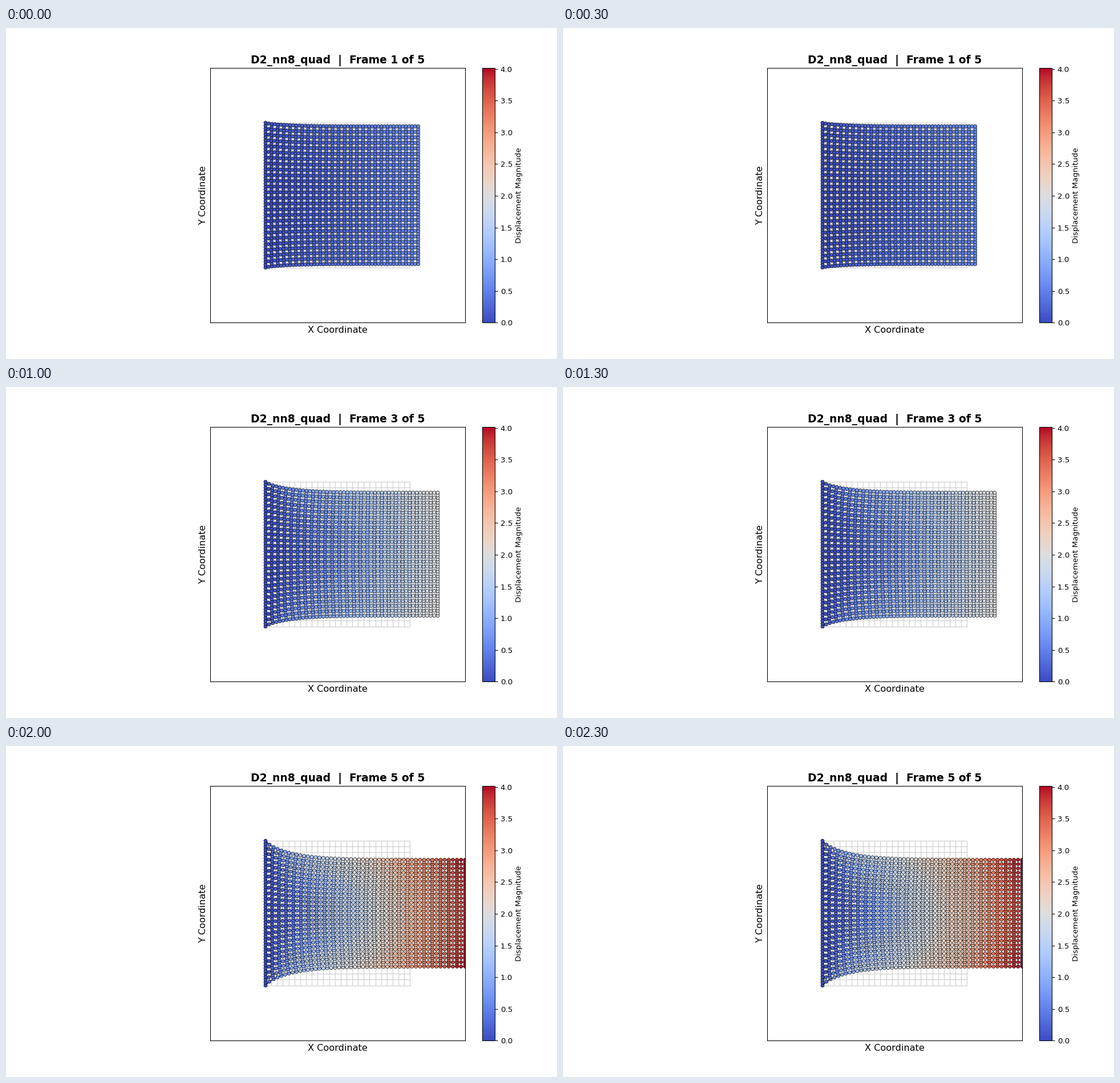
Animation, 966 px wide and 580 px high, one loop 2500 ms. Source, as a matplotlib script:

```python
import matplotlib.pyplot as plt
import numpy as np
from matplotlib.animation import FuncAnimation
from matplotlib.collections import LineCollection

# Block of SIDE x SIDE made of N x N eight-node quads, clamped on the left
# and stretched to the right (compressible neo-Hookean, plane strain).
N, SIDE = 25, 10.0
MU, LAM = 1.0, 9.0
PULLS = [0.56, 1.20, 1.91, 2.78, 3.81]
MAX_MAG = 4.02
SCALE = 0.966  # point sizes relative to a 10 inch wide figure

# Node grid; element centres carry no node
M = 2 * N + 1
gi, gj = np.meshgrid(np.arange(M), np.arange(M), indexing="ij")
has_node = ~((gi % 2 == 1) & (gj % 2 == 1))
ids = np.full((M, M), -1)
ids[has_node] = np.arange(has_node.sum())
nodes = np.column_stack([gi[has_node], gj[has_node]]) * SIDE / (M - 1)

OFFSETS = [(a, b) for a in range(3) for b in range(3) if (a, b) != (1, 1)]
elems = np.array([[ids[2 * i + a, 2 * j + b] for a, b in OFFSETS]
                  for i in range(N) for j in range(N)])
dofs = (2 * elems[:, :, None] + np.arange(2)).reshape(len(elems), 16)
rows = np.repeat(dofs, 16, axis=1).reshape(-1, 16, 16)
cols = rows.transpose(0, 2, 1)
SIZE = 2 * len(nodes)
HELD = 2 * M                       # leading unknowns on the clamped edge
WIDTH = 2 * (M + N + 1)            # unknowns per element column
BLOCKS = [slice(HELD + k * WIDTH, HELD + (k + 1) * WIDTH) for k in range(N)]
pulled = 2 * ids[-1]


def shape_gradient(x, y):
    grads = []
    for a, b in OFFSETS:
        p, q = a - 1, b - 1
        if p == 0:
            g = (-x * (1 + y * q), 0.5 * q * (1 - x * x))
        elif q == 0:
            g = (0.5 * p * (1 - y * y), -y * (1 + x * p))
        else:
            g = (0.25 * p * (1 + y * q) * (2 * x * p + y * q),
                 0.25 * q * (1 + x * p) * (2 * y * q + x * p))
        grads.append(g)
    return np.array(grads) * 2 * N / SIDE


def strain_operator():
    pts = [(-np.sqrt(0.6), 5 / 9), (0.0, 8 / 9), (np.sqrt(0.6), 5 / 9)]
    ops, weights = [], []
    for x, wx in pts:
        for y, wy in pts:
            grad = shape_gradient(x, y)
            op = np.zeros((4, 16))
            for c in range(2):
                op[2 * c:2 * c + 2, c::2] = grad.T
            ops.append(op)
            weights.append(wx * wy)
    return np.array(ops), np.array(weights)


B, W = strain_operator()


def deformation(u):
    F = np.einsum("gpm,em->egp", B, u[dofs]).reshape(len(elems), len(W), 2, 2)
    return F + np.eye(2)


def assemble(u):
    F = deformation(u)
    log_j = np.log(np.linalg.det(F))[..., None, None]
    G = np.linalg.inv(F).swapaxes(-1, -2)
    P = MU * F + (LAM * log_j - MU) * G
    A = LAM * np.einsum("egij,egkl->egijkl", G, G)
    A += ((MU - LAM * log_j)[..., None, None]
          * np.einsum("egil,egkj->egijkl", G, G))
    A = A.reshape(len(elems), len(W), 4, 4) + MU * np.eye(4)
    P = P.reshape(len(elems), len(W), 4)

    force = np.einsum("gpm,egp,g->em", B, P, W)
    stiff = (B.swapaxes(1, 2) @ (A * W[:, None, None]) @ B).sum(axis=1)
    r = np.zeros(SIZE)
    K = np.zeros((SIZE, SIZE))
    np.add.at(r, dofs, -force)
    np.add.at(K, (rows, cols), stiff)
    r[pulled] = 0
    K[pulled, :] = 0
    K[:, pulled] = 0
    K[pulled, pulled] = 1
    return K, r


def solve_columns(K, r):
    """Block tridiagonal elimination, one element column at a time."""
    D, rhs = K[BLOCKS[0], BLOCKS[0]], r[BLOCKS[0]]
    kept = []
    for left, right in zip(BLOCKS, BLOCKS[1:]):
        C = K[left, right]
        X = np.linalg.solve(D, np.column_stack([C, rhs]))
        kept.append(X)
        D = K[right, right] - C.T @ X[:, :-1]
        rhs = r[right] - C.T @ X[:, -1]
    du = np.zeros(SIZE)
    x = np.linalg.solve(D, rhs)
    du[BLOCKS[-1]] = x
    for block, X in zip(BLOCKS[-2::-1], kept[::-1]):
        x = X[:, -1] - X[:, :-1] @ x
        du[block] = x
    return du


def relax(u):
    for _ in range(12):
        du = solve_columns(*assemble(u))
        step = 1.0
        while step > 1e-3 and np.linalg.det(deformation(u + step * du)).min() < 0.1:
            step /= 2
        u = u + step * du
        if np.abs(du).max() < 1e-4:
            break
    return u


def stretch_states(substeps=2):
    u, pull, states = np.zeros(SIZE), 0.0, []
    for goal in PULLS:
        delta = (goal - pull) / substeps
        for _ in range(substeps):
            u[0::2] += delta * nodes[:, 0] / SIDE
            u = relax(u)
        pull = goal
        states.append(u.reshape(-1, 2).copy())
    return states


def mesh_lines(pos):
    lines = [pos[ids[k]] for k in range(0, M, 2)]
    return lines + [pos[ids[:, k]] for k in range(0, M, 2)]


states = stretch_states()

plt.rcParams.update({
    "font.family": "DejaVu Sans",
    "axes.linewidth": 0.8 * SCALE,
    "ytick.major.width": 0.8 * SCALE,
    "ytick.major.size": 3.5 * SCALE,
    "ytick.major.pad": 3.5 * SCALE,
    "ytick.labelsize": 10 * SCALE,
    "axes.labelpad": 4 * SCALE,
    "axes.titlepad": 6 * SCALE,
})
fig, ax = plt.subplots(figsize=(9.66, 5.8), dpi=100)
ax.set_aspect("equal")
ax.set_xlim(-PULLS[-1], SIDE + PULLS[-1])
ax.set_ylim(-PULLS[-1], SIDE + PULLS[-1])
ax.set_xticks([])
ax.set_yticks([])
ax.set_xlabel("X Coordinate", fontsize=12 * SCALE)
ax.set_ylabel("Y Coordinate", fontsize=12 * SCALE)
title = ax.set_title("", fontsize=14 * SCALE, fontweight="bold")

ax.add_collection(LineCollection(mesh_lines(nodes), colors="lightgray",
                                 linewidths=SCALE, zorder=1), autolim=False)
edges = LineCollection([], colors="black", linewidths=SCALE, zorder=2)
ax.add_collection(edges, autolim=False)
dots = ax.scatter(nodes[:, 0], nodes[:, 1], c=np.zeros(len(nodes)),
                  s=20 * SCALE ** 2, cmap="coolwarm", vmin=0, vmax=MAX_MAG,
                  edgecolors="black", linewidths=0.5 * SCALE, zorder=2.3)
bar = fig.colorbar(dots, ax=ax, fraction=0.046, pad=0.04)
bar.set_ticks(np.arange(0, 4.1, 0.5))
bar.set_label("Displacement Magnitude", fontsize=10 * SCALE)


def draw(k):
    u = states[k]
    pos = nodes + u
    edges.set_segments(mesh_lines(pos))
    dots.set_offsets(pos)
    dots.set_array(np.hypot(u[:, 0], u[:, 1]))
    title.set_text(f"D2_nn8_quad  |  Frame {k + 1} of {len(states)}")
    return edges, dots, title


anim = FuncAnimation(fig, draw, frames=len(states), interval=500, repeat=True)
plt.show()
```
